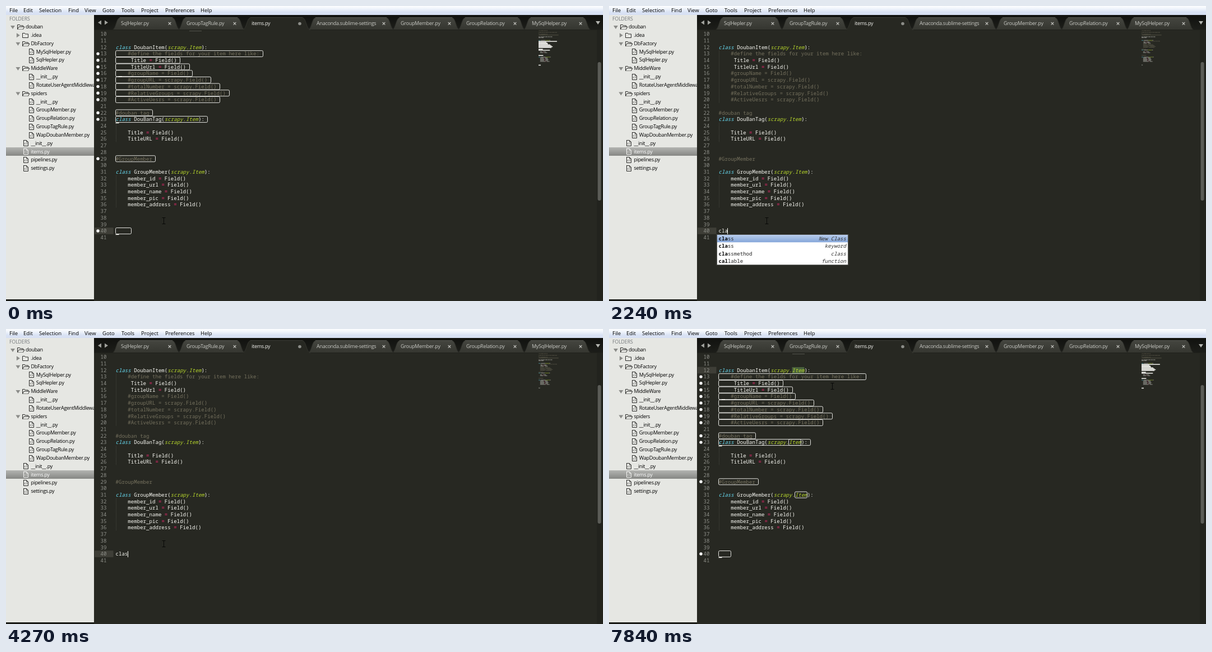
Animation of 1065x526 px, one loop 8000 ms. Source, as an HTML page with a canvas:

```html
<!DOCTYPE html>
<html lang="en">
<head>
<meta charset="utf-8">
<title>Code editor</title>
<style>
html, body { margin: 0; width: 100%; height: 100%; overflow: hidden; background: #272822; }
canvas { display: block; width: 1065px; height: 526px; }
</style>
</head>
<body>
<canvas id="stage" width="1065" height="526"></canvas>
<script>
const g = document.getElementById('stage').getContext('2d');
const LOOP = 8000, TICK = 70, BLINK = 980;
const X = 195.5, CHAR = 5.46, MONO = '500 9.1px "Noto Sans Mono", monospace', UI = '500 9px "Open Sans", sans-serif';
const WHITE = '#f8f8f2', GREY = '#75715e', CYAN = '#66d9ef', LIME = '#b9d92c', PINK = '#f92672', YELLOW = '#e6db74';

const source = `# -*- coding: utf-8 -*-

# Define here the models for your scraped items
#
# See documentation in:
# http://doc.scrapy.org/en/latest/topics/items.html

from scrapy.item import Item, Field
import scrapy


class DoubanItem(scrapy.Item):
    #define the fields for your item here like:
     Title = Field()
     TitleUrl = Field()
    #groupName = Field()
    #groupURL = scrapy.Field()
    #totalNumber = scrapy.Field()
    #RelativeGroups = scrapy.Field()
    #ActiveUesrs = scrapy.Field()

#douban tag
class DouBanTag(scrapy.Item):

    Title = Field()
    TitleURL = Field()


#GroupMember

class GroupMember(scrapy.Item):
    member_id = Field()
    member_url = Field()
    member_name = Field()
    member_pic = Field()
    member_address = Field()


`.split('\n');
const snippet = `class ClassName(object):
       """docstring for ClassName"""
       def __init__(self, arg):
           super(ClassName, self).__init__()
           self.arg = arg
   `;

// [time, text from line 40 on, caret column, blink start]
const edits = [
  [0, '    ', 1, -560], [2030, 'c', 1, 2030], [2240, 'cla', 3, 2240], [2380, 'clas', 4, 2380],
  [2730, snippet, 15, 2730], [2940, snippet, 15, 2940], [4270, 'clas', 4, 4270],
  [5600, 'cla', 3, 5600], [5670, '   ', 0, 5600], [7070, '   ', 27, 7070]
];
const popups = [
  [2100, 1, ['class|New Class', 'callable|function', 'chr|function', 'class|keyword', 'classmethod|class',
    'cmp|function', 'compile|function', 'complex|class']],
  [2240, 3, ['class|New Class', 'class|keyword', 'classmethod|class', 'callable|function']],
  [2380, 4, ['class|New Class', 'class|keyword', 'classmethod|class']],
  [2730, 0, []]
];
const mousePath = [[0, 281, 383], [6300, 281, 383], [6440, 351, 388], [6650, 430, 242], [6790, 401, 128],
  [6930, 345, 80], [7350, 345, 80], [7560, 398, 102], [LOOP, 398, 102]];
const lintSpans = [[0, 2030], [3640, 4270], [4970, 5600], [6370, LOOP]];
const lintLines = [13, 14, 15, 16, 17, 18, 19, 20, 22, 23, 29, 40, 45];

const lineY = n => 50 + (n - 10) * 11.7;
const colX = c => X + c * CHAR;
const latest = (list, t) => list.filter(e => e[0] <= t).pop();

function text(s, x, y, color, font = UI, align = 'left', spacing = '0px') {
  g.font = font;
  g.fillStyle = color;
  g.textAlign = align;
  g.letterSpacing = spacing;
  g.fillText(s, x, y + 3.2);
}
const label = (s, x, y, color) => text(s, x, y, color, UI, 'left', '-0.28px');

function rect(x, y, w, h, color) {
  g.fillStyle = color;
  g.fillRect(x, y, w, h);
}
function fade(y, h, ...colors) {
  const grad = g.createLinearGradient(0, y, 0, y + h);
  colors.forEach((c, i) => grad.addColorStop(i / (colors.length - 1), c));
  return grad;
}
// Polyline from a flat list of coordinates
function shape(points, color, filled, width = 1) {
  g.beginPath();
  for (let i = 0; i < points.length; i += 2) g.lineTo(points[i], points[i + 1]);
  g.lineWidth = width;
  g.fillStyle = g.strokeStyle = color;
  filled ? g.fill() : g.stroke();
}
function dot(x, y, r, color) {
  g.beginPath();
  g.arc(x, y, r, 0, 7);
  g.fillStyle = color;
  g.fill();
}
function outline(n, from, length) {
  g.beginPath();
  g.roundRect(Math.round(colX(from)) - 0.5, lineY(n) - 5.5, Math.ceil(length * CHAR), 10.95, 2);
  g.lineWidth = 0.9;
  g.strokeStyle = '#f8f8f4';
  g.stroke();
}

function styleOf(s) {
  if (s[0] === '#') return [GREY];
  if (s[0] === '"') return [YELLOW];
  if (s === '=') return [PINK];
  if (s === '__init__' || s === 'super') return [CYAN];
  return /class|def/.test(s) ? [CYAN, 'italic '] : [LIME, 'italic '];
}
// Calls draw(part, column, color, fontStyle) for each coloured part
function tokens(line, draw) {
  let col = 0;
  line.split(/(#.*|""".*|\bclass\b|\bdef\b|=|\bsuper\b|__init__|scrapy\.Item|\bobject\b|\bself\b)/).forEach((part, i) => {
    const [color, style = ''] = i % 2 ? styleOf(part) : [WHITE];
    if (part.trim()) draw(part, col, color, style);
    col += part.length;
  });
}

function drawMenu() {
  rect(0, 0, 1065, 16, fade(0, 16, '#fdfeff', '#eef3fb', '#dae3f4', '#d6dff3'));
  const items = { File: 6, Edit: 31, Selection: 59, Find: 111, View: 140, Goto: 172, Tools: 206, Project: 241, Preferences: 284, Help: 347 };
  for (const name in items) text(name, items[name], 7.5, '#000', '500 9.5px "Open Sans", sans-serif');
}

function drawFolder(x, y, open) {
  const c = '#2c2c2a';
  shape([x, y + 4, x, y - 4, x + 4, y - 4, x + 5, y - 2.5, x + 10, y - 2.5, x + 10, y + 4, x, y + 4], c);
  if (open) {
    const flap = [x, y + 4, x + 2.5, y - 0.5, x + 12.5, y - 0.5, x + 10, y + 4];
    shape(flap, '#e6e7e3', true);
    shape(flap, c);
  }
}
function drawFile(x, y, color) {
  shape([x, y - 5, x + 5, y - 5, x + 8, y - 2, x + 8, y + 5, x, y + 5, x, y - 5.5], color);
  shape([x + 5, y - 5, x + 5, y - 2, x + 8, y - 2], color, false, 0.8);
  shape([x + 3, y - 0.5, x + 1.8, y + 1, x + 3, y + 2.5], color, false, 0.8);
  shape([x + 5, y - 0.5, x + 6.2, y + 1, x + 5, y + 2.5], color, false, 0.8);
}

// Leading digit is the depth; v marks an open folder, > a closed one
const tree = ['0vdouban', '1>.idea', '1vDbFactory', '2 MySqlHelper.py', '2 SqlHepler.py', '1vMiddleWare',
  '2 __init__.py', '2 RotateUserAgentMiddleware.py', '1vspiders', '2 __init__.py', '2 GroupMember.py',
  '2 GroupRelation.py', '2 GroupTagRule.py', '2 WapDoubanMember.py', '1 __init__.py', '1 items.py',
  '1 pipelines.py', '1 settings.py'];

function drawSidebar() {
  g.save();
  g.beginPath();
  g.rect(0, 16, 157, 510);
  g.clip();
  rect(0, 16, 157, 507, '#e6e7e3');
  rect(0, 523, 157, 3, '#1b1c18');
  text('FOLDERS', 6, 22.5, '#73777a', '500 8.6px "Open Sans", sans-serif');
  tree.forEach((entry, i) => {
    const x = 35 + 9.4 * entry[0], y = 37 + i * 14.82, kind = entry[1], name = entry.slice(2);
    const selected = name === 'items.py';
    if (selected) rect(0, 252, 157, 15, fade(252, 15, '#b3b4b1', '#868784'));
    if (kind === ' ') drawFile(Math.round(x - 13) + 0.5, Math.round(y) + 0.5, selected ? '#f4f4f2' : '#2c2c2a');
    else {
      const ax = x - 23;
      drawFolder(Math.round(x - 15) + 0.5, Math.round(y) + 0.5, kind === 'v');
      shape(kind === 'v' ? [ax - 4, y - 2, ax + 4, y - 2, ax, y + 4] : [ax - 2.5, y - 3.5, ax + 3.5, y + 0.5, ax - 2.5, y + 4.5], '#8b8c89', true);
    }
    label(name, x, y, selected ? '#ffffff' : '#000000');
  });
  g.restore();
}

// [name, text x, close button x]
const tabs = [['MySqlHelper.py', 938, 1025], ['GroupRelation.py', 821, 908], ['GroupMember.py', 704, 791],
  ['Anaconda.sublime-settings', 554, 674], ['GroupTagRule.py', 322, 408], ['SqlHepler.py', 205, 292], ['items.py', 438, 524]];

function drawTabs() {
  rect(157, 16, 908, 27, fade(16, 27, '#11120f', '#1d1e1a'));
  shape([170, 25.5, 170, 33.5, 164, 29.5], '#a0a19c', true);
  shape([176, 25.5, 176, 33.5, 182, 29.5], '#a0a19c', true);
  shape([1052, 27, 1060, 27, 1056, 33], '#b5b6b1', true);
  for (const [name, x, end] of tabs) {
    const active = name === 'items.py', a = x - 16, b = end + 19;
    g.beginPath();
    g.moveTo(a, 43);
    g.bezierCurveTo(a + 8, 41, a + 7, 20.5, a + 15, 20.5);
    g.lineTo(b - 15, 20.5);
    g.bezierCurveTo(b - 7, 20.5, b - 8, 41, b, 43);
    g.fillStyle = active ? '#272822' : fade(20, 22, '#454640', '#353630');
    g.fill();
    g.lineWidth = 1;
    g.strokeStyle = active ? '#33342e' : '#2b2c27';
    g.stroke();
    rect(a + 14, 20, b - a - 28, 1, active ? '#3c3d37' : '#54554f');
    label(name, x, 31, active ? '#f2f2ee' : '#c9cac5');
    if (active) dot(end, 31.5, 2.8, '#8c8d88');
    else {
      shape([end - 2.3, 29, end + 2.3, 33.6], '#c0c1bc', false, 1.2);
      shape([end + 2.3, 29, end - 2.3, 33.6], '#c0c1bc', false, 1.2);
    }
  }
  rect(157, 42, 267, 1, '#20211c');
  rect(543, 42, 522, 1, '#20211c');
}

function drawMinimap(lines, marked) {
  lines.forEach((line, i) => {
    const y = 43.5 + i * 1.57;
    if (marked && lintLines.includes(i + 1)) return rect(950, y, Math.max(4, line.length * 0.7), 1.5, '#f2f2ee');
    tokens(line, (part, col, color) => {
      g.globalAlpha = color === GREY ? 0.6 : 0.55;
      for (const word of part.matchAll(/\S+/g)) rect(950 + (col + word.index) * 0.7, y, word[0].length * 0.7, 0.9, color);
    });
    g.globalAlpha = 1;
  });
}

function drawPopup(t) {
  const popup = latest(popups, t);
  if (!popup || !popup[2].length) return;
  const [, matched, rows] = popup, h = rows.length * 13.3;
  rect(191.5, 407, 236, h + 2, '#4b4c48');
  rect(193, 408, 233, h, '#ffffff');
  rect(193, 408, 233, 13.3, fade(408, 13, '#b9cdec', '#86a7da'));
  rows.forEach((row, i) => {
    const [name, kind] = row.split('|'), y = 414.7 + i * 13.3;
    const n = name.startsWith('clas') ? matched : Math.min(matched, 3);
    text(name.slice(0, n), X, y, '#000', MONO.replace('500', 'bold'));
    text(name.slice(n), colX(n), y, '#222', MONO);
    text(kind, 423, y, '#333', 'italic ' + MONO, 'right');
  });
}

function drawTooltip() {
  rect(273, 407, 234, 53.5, '#55564f');
  rect(274.5, 408.5, 231, 50.5, '#151612');
  text('items.ClassName ClassName(self, arg)', 277.5, 419, '#4c8fa0', '10.35px "Noto Sans Mono", monospace');
  text('docstring for ClassName', 277.5, 442, '#d8b758', MONO);
}

function drawMouse(t) {
  const i = mousePath.findIndex(p => p[0] > t), [t0, x0, y0] = mousePath[i - 1], [t1, x1, y1] = mousePath[i];
  const k = (t - t0) / (t1 - t0);
  const x = Math.round(x0 + (x1 - x0) * k) + 0.5, y = Math.round(y0 + (y1 - y0) * k);
  shape([x, y - 5, x, y + 5], '#070806');
  for (const s of [-5.5, 5.5]) shape([x - 3, y + s, x + 3, y + s], '#070806');
}

function caretAlpha(age) {
  const step = Math.floor((age % BLINK) / TICK);
  if (step < 5) return age < BLINK ? 1 : Math.min(1, (step + 1) / 3);
  return Math.max(0, (7 - step) / 3);
}

function drawEditor(t) {
  const [, typed, col, blinkStart] = latest(edits, t);
  const expanded = typed === snippet, clicked = t >= 7070, selected = t >= 7210, related = t >= 7420;
  const lint = lintSpans.some(([a, b]) => t >= a && t < b);
  const lines = [...source.slice(0, 39), ...typed.split('\n'), ''];
  const row = clicked ? 12 : 40;

  for (const n of expanded ? [40, 41, 43] : [row]) rect(158, lineY(n) - 5.85, 33.5, 11.7, '#3e3e37');
  if (expanded) rect(colX(6), 396, 9 * CHAR, 11, '#53534b');
  if (selected) rect(colX(24), 68, 4 * CHAR, 11, '#4a613d');

  g.setLineDash([1, 1]);
  for (const [a, b] of [[13, 20], [24, 26], [32, 36], ...(expanded ? [[41, 44]] : [])])
    shape([196.5, lineY(a) - 5.5, 196.5, lineY(b) + 5.5], '#45463f');
  if (expanded) shape([colX(7) - 0.2, lineY(43) - 5.5, colX(7) - 0.2, lineY(44) + 5.5], '#45463f');
  g.setLineDash([]);

  lines.forEach((line, i) => {
    const n = i + 1, y = lineY(n);
    if (n < 10) return;
    text(n, 179.5, y, '#8f908a', MONO, 'right');
    tokens(line, (part, c, color, style) => text(part, colX(c), y, color, style + MONO));
    if (lint && lintLines.includes(n)) {
      dot(164, y, 2.7, '#ffffff');
      outline(n, 0, line.length + 1);
    }
  });
  if (lint) {
    rect(327, 44, 22, 1, '#55564f');
    rect(201, 125, 6, 1.3, WHITE);
    for (const n of [23, 40]) rect(195.5, lineY(n) + 5.8, 6, 1.3, WHITE);
  }
  if (related) {
    outline(23, 23, 4);
    outline(31, 25, 4);
  }

  g.globalAlpha = selected ? 0 : caretAlpha(t - blinkStart);
  rect(Math.round(colX(col) - 0.6), Math.round(lineY(row) - 5.5), 1, 11, WHITE);
  g.globalAlpha = 1;

  drawMinimap(lines, t < 2030 || related);
  rect(1054, 43, 11, 483, '#22231e');
  g.beginPath();
  g.roundRect(1055.5, expanded ? 97 : 100, 6, expanded ? 231 : 247, 3);
  g.fillStyle = '#5b5c57';
  g.fill();

  drawPopup(t);
  if (expanded && t >= 2940) drawTooltip();
  drawMouse(t);
}

function frame(now) {
  const t = Math.floor((now % LOOP) / 10) * 10;
  rect(0, 0, 1065, 526, '#272822');
  drawEditor(t);
  drawTabs();
  drawSidebar();
  drawMenu();
  requestAnimationFrame(() => frame(performance.now() - start));
}
const start = performance.now();
frame(0);
</script>
</body>
</html>
```
